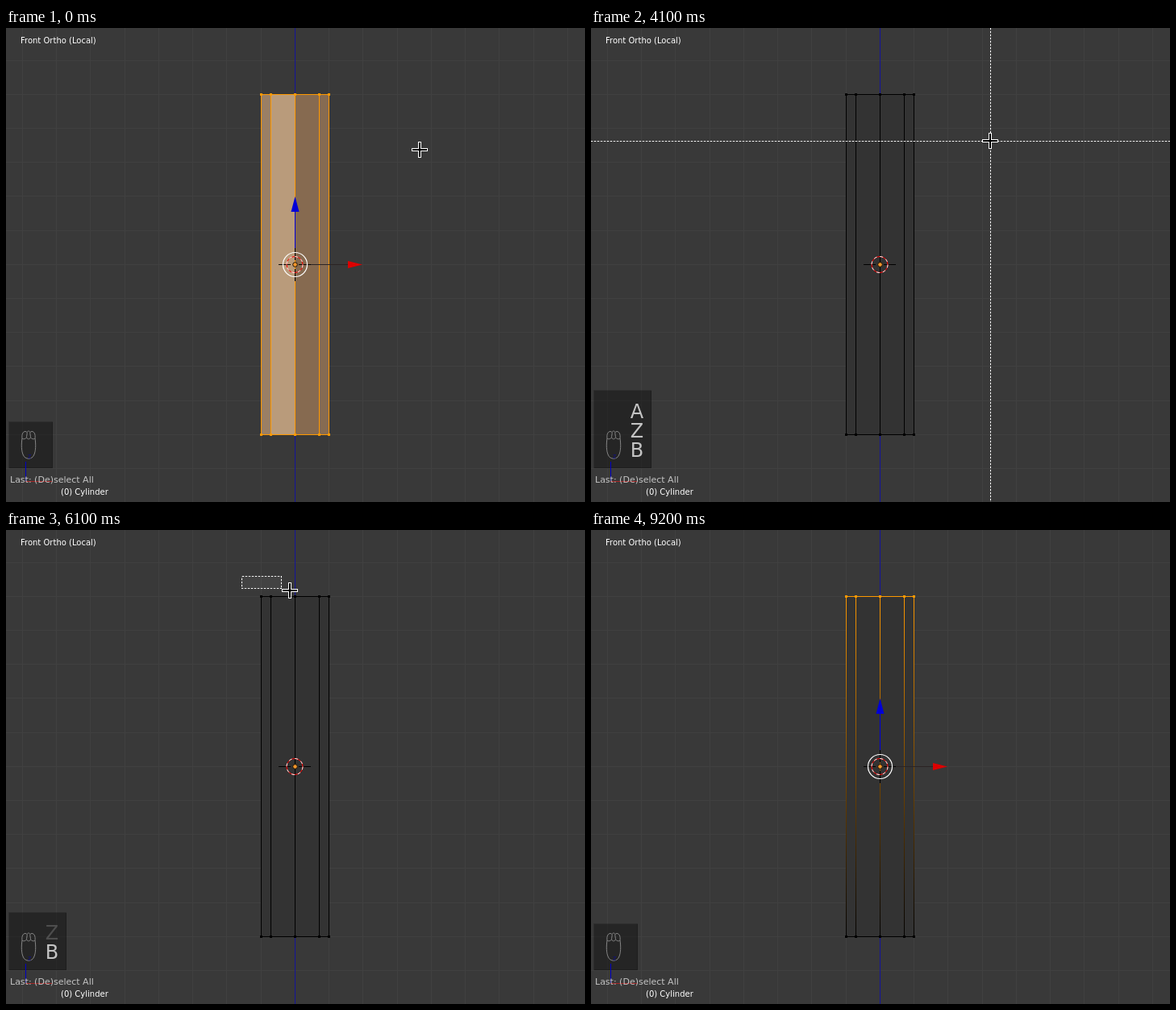
These frames come from a looping animation (718x588 px, 9.6 s). An HTML page:

```html
<!DOCTYPE html>
<html lang="en">
<head>
<meta charset="utf-8">
<title>Border select</title>
<style>
html, body { margin: 0; width: 100%; height: 100%; overflow: hidden; background: #393939; }
svg { display: block; width: 718px; height: 588px; font-family: "DejaVu Sans", sans-serif; }
.crisp { shape-rendering: crispEdges; }
</style>
</head>
<body>
<svg id="stage" viewBox="0 0 718 588" xmlns="http://www.w3.org/2000/svg">
  <defs>
    <linearGradient id="fade" gradientUnits="userSpaceOnUse" x1="0" y1="82" x2="0" y2="505">
      <stop offset="0" stop-color="#ff9900"/>
      <stop offset="1" stop-color="#000"/>
    </linearGradient>
  </defs>
  <rect width="718" height="588" fill="#393939"/>
  <path id="grid" class="crisp" stroke="#404040" fill="none"/>
  <path class="crisp" d="M358.5 0V588" stroke="#14149a"/>

  <g id="faces" class="crisp"></g>
  <g id="edges" class="crisp" fill="none"></g>
  <g id="dots" class="crisp"></g>

  <g id="gizmoLines" class="crisp" fill="none">
    <path d="M374 293.5H424" stroke="#2b2424"/>
    <path d="M358.5 278V228" stroke="#0000d8"/>
  </g>
  <path class="crisp" d="M338 293.5H353M363 293.5H378M358.5 273V288M358.5 299V314" stroke="#000"/>
  <circle cx="358" cy="293.5" r="10" fill="none" stroke="#f00"/>
  <circle cx="358" cy="293.5" r="10" fill="none" stroke="#fff" stroke-dasharray="3.927"/>
  <circle cx="358.5" cy="293.5" r="2.8" fill="#f0962c" stroke="#1c1206"/>
  <g id="gizmo">
    <circle cx="358.5" cy="293.5" r="15" fill="none" stroke="#fff" stroke-width="1.2"/>
    <path d="M353.5 228L358.5 209L363.5 228Z" fill="#0000d8"/>
    <path d="M424 289L442 293.5L424 298Z" fill="#dd0000"/>
  </g>

  <rect id="panel" class="crisp" x="3.5" y="488.5" width="54" height="57" fill="#000" fill-opacity=".36" stroke="#000" stroke-opacity=".2"/>
  <g fill="none" stroke="#858585">
    <path d="M20 509C18.8 517 19 525 21.5 530C23.5 535.5 32.500 535.5 34.500 530C37 525 37.200 517 36 509"/>
    <path d="M20 509C19.300 504 21 500.500 24 500.500C26 500.500 26.500 502 26 504L25.500 507.500C25 510 21 510.500 20 509Z"/>
    <path d="M36 509C36.700 504 35 500.500 32 500.500C30 500.500 29.500 502 30 504L30.500 507.500C31 510 35 510.500 36 509Z"/>
    <path d="M26 501.500C27 499.500 29 499.500 30 501.500M25.500 508C27 510.500 29 510.500 30.500 508"/>
  </g>
  <g id="keys" fill="#c4c4c4" font-size="24" text-anchor="middle"></g>
  <path class="crisp" d="M24.500 538V563" stroke="#0000c4"/>
  <path class="crisp" d="M24 562.500H58" stroke="#a42626"/>
  <text x="27" y="534" font-size="8" fill="#101080">z</text>

  <text x="5" y="564" font-size="11" fill="#c4c4c4">Last: (De)select All</text>
  <text x="68" y="579" font-size="10" fill="#fff">(0) Cylinder</text>
  <text x="18" y="19" font-size="10" fill="#fff">Front Ortho (Local)</text>

  <g id="cross" class="crisp" fill="none">
    <path stroke="#606060"/><path stroke="#fff" stroke-dasharray="2 2"/>
  </g>
  <g id="marquee" class="crisp">
    <path fill="#fff" fill-opacity=".05" stroke="#606060"/>
    <path fill="none" stroke="#fff" stroke-dasharray="2 2"/>
  </g>
  <g id="pointer" class="crisp" fill="none">
    <path d="M-10 0H10M0 -10V10" stroke="#fff" stroke-width="4"/>
    <path d="M-9 0H9M0 -9V9" stroke="#000" stroke-width="2"/>
  </g>
</svg>
<script>
const LOOP = 9600, STEP = 100;
const T = { deselect: 1300, wire: 2700, border: 4100, drag: 5700, release: 7300, exit: 9200 };
const TOP = 82.5, BOTTOM = 504.5;
const xs = [316.5, 328.5, 358.5, 388.5, 400.5];
const ORANGE = "#ff9900";
const warm = ["#9a7f65", "#b99b7b", "#866a50", "#866b52"];
const plain = ["#747474", "#969696", "#5b5b65", "#575766"];

// time, x, y
const path = [
  [100, 513, 151], [200, 525, 146], [300, 542, 130], [400, 538, 113],
  [500, 518, 109], [600, 501, 126], [700, 495, 140],
  [4300, 495, 140], [4400, 490, 136], [4700, 443, 100], [5000, 377, 61],
  [5100, 354, 57], [5200, 330, 57], [5300, 308, 57], [5400, 292, 57],
  [5600, 292, 57], [5700, 297, 58], [5800, 311, 62], [6000, 342, 73],
  [6100, 352, 75], [6400, 391, 85], [6600, 424, 95], [6700, 433, 98],
  [8800, 433, 98], [8900, 428, 84], [9000, 417, 52], [9100, 400, 13]
];
const keys = [["A", T.deselect], ["Z", T.wire], ["B", T.border]];
const FADE = 3200, GONE = 3500;

const $ = id => document.getElementById(id);
const show = (id, on) => $(id).setAttribute("visibility", on ? "visible" : "hidden");
const setPaths = (id, d) => { for (const p of $(id).children) p.setAttribute("d", d); };

function pointerAt(t) {
  const i = path.findIndex(p => p[0] >= t);
  if (i === 0) return path[0].slice(1);
  if (i < 0) return path[path.length - 1].slice(1);
  const [t0, x0, y0] = path[i - 1], [t1, x1, y1] = path[i];
  const k = (t - t0) / (t1 - t0);
  return [Math.round(x0 + (x1 - x0) * k), Math.round(y0 + (y1 - y0) * k)];
}

function drawGrid() {
  let d = "";
  for (let i = -8; i <= 8; i++) d += `M${Math.floor(358.4 + i * 42.25) + .5} 0V588`;
  for (let i = -6; i <= 6; i++) d += `M0 ${Math.floor(293.3 + i * 42.2) + .5}H718`;
  $("grid").setAttribute("d", d);
}

function drawMesh(mode) {
  const top = mode === "plain" || mode === "wire" ? "#000" : ORANGE;
  const bottom = mode === "warm" ? ORANGE : "#000";
  const side = mode === "partial" ? "url(#fade)" : top;
  const fills = mode === "warm" ? warm : mode === "plain" ? plain : Array(4).fill("#333333");
  const rect = (x, y, w, h, fill) => `<rect x="${x}" y="${y}" width="${w}" height="${h}" fill="${fill}"/>`;
  $("faces").innerHTML = fills.map((f, i) => rect(xs[i], TOP, xs[i + 1] - xs[i], BOTTOM - TOP, f)).join("");
  $("edges").innerHTML =
    xs.map(x => rect(x - .5, TOP, 1, BOTTOM - TOP, side)).join("") +
    rect(316, 82, 85, 1, top) + rect(316, 504, 85, 1, bottom);
  $("dots").innerHTML = xs.map(x =>
    rect(x - 1.5, TOP - 1.5, 3, 3, top) + rect(x - 1.5, BOTTOM - 1.5, 3, 3, bottom)).join("");
}

function drawKeys(t) {
  const live = keys.filter(([, at]) => t >= at && t < at + GONE);
  const n = live.length;
  const y = [488.5, 488.5, 474.5, 449.5][n];
  const panel = $("panel");
  panel.setAttribute("y", y);
  panel.setAttribute("height", 545.5 - y);
  panel.setAttribute("width", n ? 71 : 54);
  const base = n === 1 ? 528 : 532;
  $("keys").innerHTML = live.map(([name, at], i) => {
    const age = t - at;
    const alpha = age < FADE ? 1 : (GONE + STEP - age) / 400 - .0;
    return `<text x="57" y="${base - 24 * (n - 1 - i)}" opacity="${Math.min(1, alpha - (age < FADE ? 0 : .25))}">${name}</text>`;
  }).join("");
}

let lastMode, lastT;
function render(now) {
  const t = Math.floor(now % LOOP / STEP) * STEP;
  if (t === lastT) return;
  lastT = t;

  const mode = t < T.deselect ? "warm" : t < T.wire ? "plain" : t < T.release ? "wire" : "partial";
  if (mode !== lastMode) drawMesh(lastMode = mode);
  const selected = mode === "warm" || mode === "partial";
  show("gizmo", selected);
  show("gizmoLines", selected);
  drawKeys(t);

  const [px, py] = pointerAt(t);
  $("pointer").setAttribute("transform", `translate(${px} ${py})`);
  show("pointer", t < T.exit);

  // guides trail the pointer by one step
  const [gx, gy] = pointerAt(t - STEP);
  show("cross", t >= T.border && t < T.drag);
  setPaths("cross", `M0 ${gy + .5}H718M${gx + .5} 0V588`);
  const dragging = t >= T.drag && t < T.release;
  show("marquee", dragging);
  if (dragging) setPaths("marquee", `M292.5 57.5H${gx - .5}V${gy - .5}H292.5Z`);
}

function tick() {
  render(performance.now());
  requestAnimationFrame(tick);
}
drawGrid();
tick();
</script>
</body>
</html>
```
